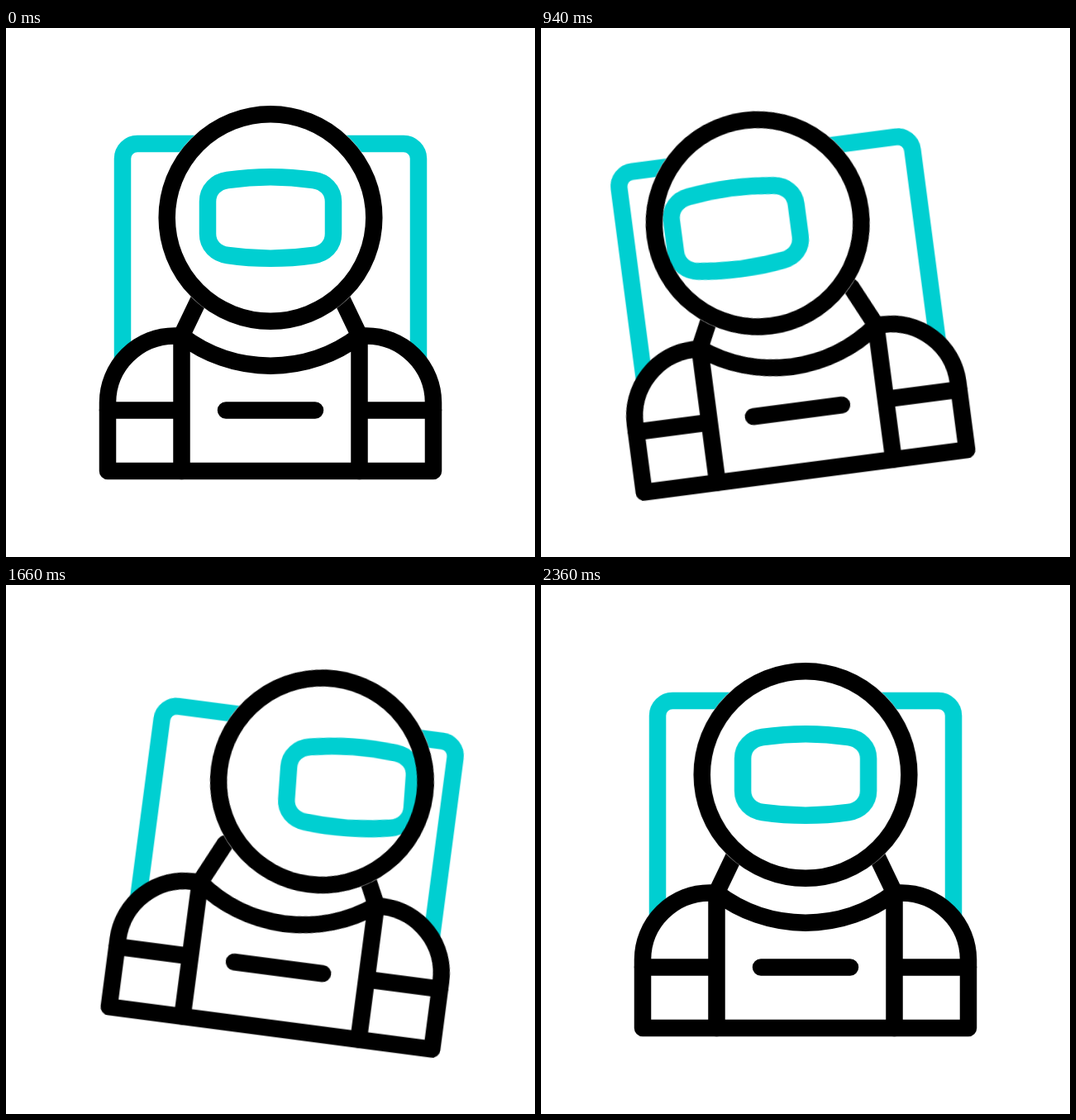
An HTML page without scripts that plays this animation: 640x640 px, repeating every 2.4 s.

```html
<!DOCTYPE html>
<html lang="en">
<head>
<meta charset="utf-8">
<title>Swaying astronaut</title>
<style>
  html, body { margin: 0; width: 100%; height: 100%; overflow: hidden; background: #fff; }
  svg { display: block; width: 100%; height: 100%; }

  .line { fill: none; stroke: #000; stroke-width: 20.5; stroke-linecap: round; stroke-linejoin: round; }
  .teal { stroke: #00cfd1; }
  .white { fill: #fff; }

  .figure, .pack, .head, .visor {
    --smooth: cubic-bezier(.333, 0, .667, 1);
    animation: 2.4s var(--smooth) infinite;
  }
  .figure { transform-origin: 320px 536px; animation-name: sway; }
  .pack { animation-name: bob; }
  .head, .visor { transform-origin: 320px 229.5px; }
  .head { animation-name: lean; }
  .visor { animation-name: look, tilt; }

  @keyframes sway {
    0%, 99.2%, 100% { transform: rotate(0deg); }
    31.25% { transform: rotate(-9.8deg); }
    66.25% { transform: rotate(7.75deg); animation-timing-function: cubic-bezier(.26, 0, .61, 1); }
  }
  @keyframes bob {
    0%, 99.2%, 100% { transform: translateY(0); }
    21.7% { transform: translateY(25.5px); }
    49.2% { transform: translateY(2.5px); }
    70.8% { transform: translateY(25px); }
  }
  /* Swing along an arc while staying upright. */
  @keyframes lean {
    0%, 99.2%, 100% { transform: translateY(100px) rotate(0deg) translateY(-100px) rotate(0deg); }
    30.6% { transform: translateY(100px) rotate(-14.5deg) translateY(-100px) rotate(14.5deg); }
    66.9% {
      transform: translateY(100px) rotate(13.6deg) translateY(-100px) rotate(-13.6deg);
      animation-timing-function: cubic-bezier(.26, 0, .61, 1);
    }
  }
  @keyframes look {
    0%, 99.2%, 100% { transform: translateY(130px) rotate(0deg) translateY(-130px) rotate(0deg); }
    31.25% { transform: translateY(130px) rotate(-17deg) translateY(-130px) rotate(17deg); }
    63.75% { transform: translateY(130px) rotate(16.5deg) translateY(-130px) rotate(-16.5deg); }
  }
  @keyframes tilt {
    0%, 37.5%, 88.3%, 100% { rotate: 0deg; }
    61.7% { rotate: -4.2deg; }
  }
</style>
</head>
<body>
<svg viewBox="0 0 640 640">
  <g class="figure">
    <path class="pack line teal" d="M141 430V158a18 18 0 0 1 18-18H481a18 18 0 0 1 18 18V430"/>

    <path class="line" d="M236.5 322L212.5 372M403.5 322L427.5 372"/>
    <path class="white" d="M123 536V453A81 81 0 0 1 204 372.5H212.5A178 178 0 0 0 427.5 372.5H436A81 81 0 0 1 517 453V536Z"/>
    <path class="line" d="M212.5 372.5H204A81 81 0 0 0 123 453V536H517V453A81 81 0 0 0 436 372.5H427.5"/>
    <path class="line" d="M212.5 536V372.5A178 178 0 0 0 427.5 372.5V536M123 462.5H212.5M427.5 462.5H517M266 462.5H374"/>

    <g class="head">
      <circle class="white" cx="320" cy="229.5" r="135.7"/>
      <path class="visor line teal" d="M268 184Q320 176.5 372 184C386 186 396 196 396 210V249C396 263 386 273 372 275Q320 282.5 268 275C254 273 244 263 244 249V210C244 196 254 186 268 184Z"/>
      <circle class="line" cx="320" cy="229.5" r="125.3"/>
    </g>
  </g>
</svg>
</body>
</html>
```
